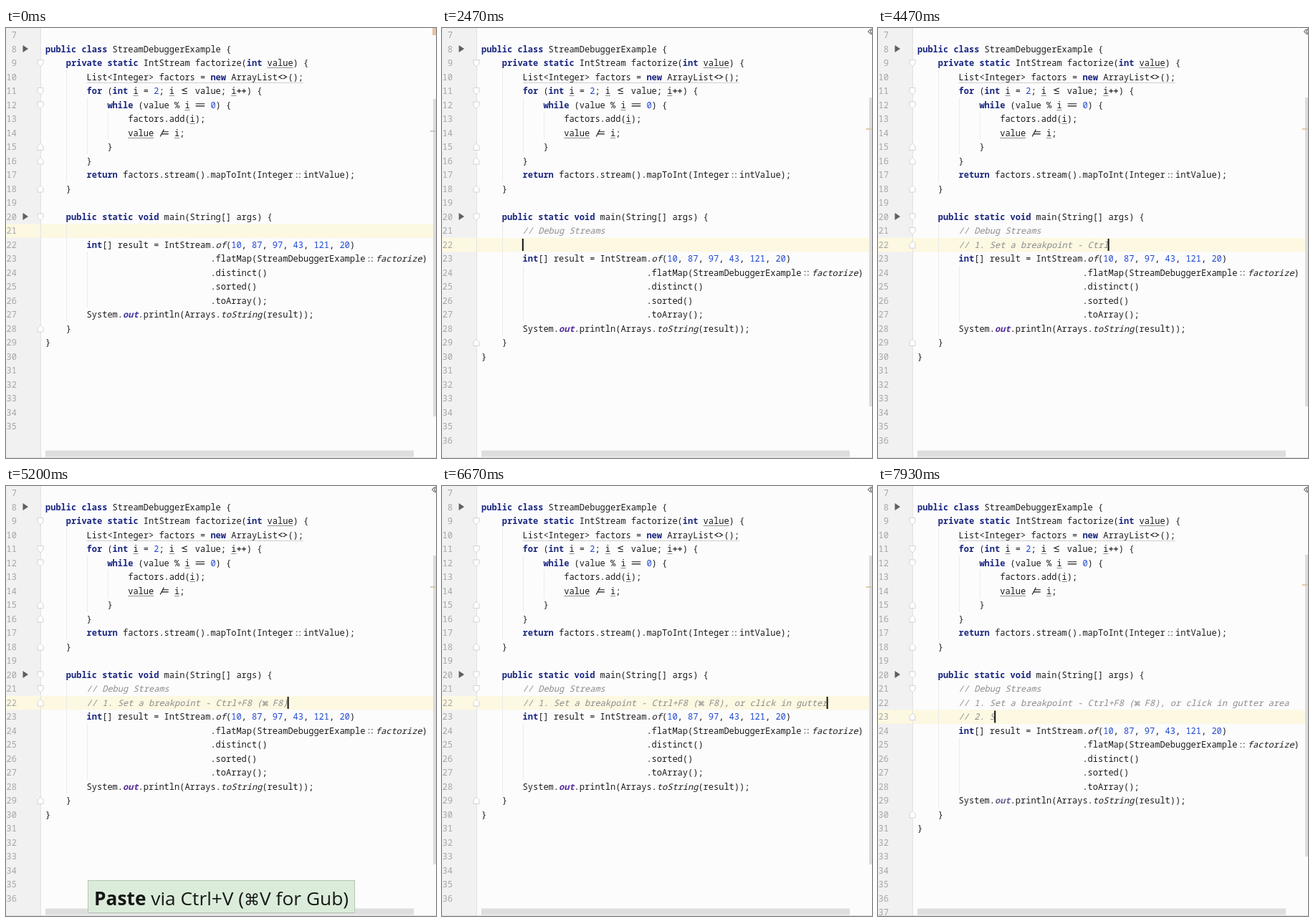
These frames come from a looping animation (600x600 px, 8 s). An HTML page:

```html
<!DOCTYPE html>
<html lang="en">
<head>
<meta charset="utf-8">
<title>Typing comments in a code editor</title>
<style>
  html, body { margin: 0; width: 100%; height: 100%; overflow: hidden; background: #fdfcfd; }
  svg { display: block; width: 600px; height: 600px; }
  text { font: 12px "Noto Sans Mono", "DejaVu Sans Mono", monospace; fill: #1b1b1d; white-space: pre; }
  .kw { font-weight: 700; fill: #18267f; }
  .num { fill: #1f48cf; }
  .it { font-style: italic; }
  .field { font-weight: 700; font-style: italic; }
  .comment { font-style: italic; fill: #8b8b8d; }
  .comment.key { font: 9.5px "DejaVu Sans", sans-serif; fill: #77777a; }
  .line { fill: #a6a6a9; text-anchor: end; }
  .lig { fill: none; stroke: #1b1b1d; stroke-width: 1.15; }
  .fold { fill: #fff; stroke: #d2d2d4; }
  .guide { fill: #ebebec; }
  .popup text { font: 26.3px "Open Sans", "Noto Sans", sans-serif; fill: #161816; }
  .popup .b { font-weight: 700; }
  .popup .cmd { font-size: 22px; font-family: "DejaVu Sans", sans-serif; }
</style>
</head>
<body>
<svg id="stage" viewBox="0 0 600 600"></svg>
<script>
const LOOP = 8000, TICK = 200 / 3;
const CELL = 7.2, LEFT = 55, PITCH = 19.5, INDENT = LEFT + 8 * CELL;
const mid = line => 10 + (line - 7) * PITCH;
const stage = document.getElementById("stage");

function add(parent, tag, attrs = {}, text) {
  const el = document.createElementNS("http://www.w3.org/2000/svg", tag);
  for (const name in attrs) el.setAttribute(name, attrs[name]);
  if (text !== undefined) el.textContent = text;
  parent.append(el);
  return el;
}
const rect = (parent, x, y, width, height, fill, more) =>
  add(parent, "rect", { x, y, width, height, fill, ...more });
const show = (el, on) => el.setAttribute("visibility", on ? "visible" : "hidden");

// Two-cell ligatures, drawn from the baseline
const LIGATURES = {
  "<>": "M6.6-7L1.8-4.2L6.6-1.4M7.8-7L12.6-4.2L7.8-1.4",
  "<=": "M10.6-8.2L3.8-5.5L10.6-2.8M3.8-.5H10.6",
  "==": "M.9-5.8H13.4M.9-2.6H13.4",
  "/=": "M1.8 1L7-9M5.4-5.8H13.4M3.8-2.6H13.4",
  "++": "M.9-4.2H6.7M3.8-7.1V-1.3M7.7-4.2H13.5M10.6-7.1V-1.3",
  "::": "M4.3-5.8h1.5M4.3-.8h1.5M8.6-5.8h1.5M8.6-.8h1.5"
};

// _name_ is underlined, *name* is italic, ~name~ is a static field
const CODE = {
  8: [0, "public class StreamDebuggerExample {"],
  9: [4, "private static IntStream factorize(int _value_) {"],
  10: [8, "List<Integer> factors = new ArrayList<>();"],
  11: [8, "for (int _i_ = 2; _i_ <= value; _i_++) {"],
  12: [12, "while (value % _i_ == 0) {"],
  13: [16, "factors.add(_i_);"],
  14: [16, "_value_ /= _i_;"],
  15: [12, "}"],
  16: [8, "}"],
  17: [8, "return factors.stream().mapToInt(Integer::intValue);"],
  18: [4, "}"],
  20: [4, "public static void main(String[] args) {"],
  22: [8, "int[] result = IntStream.*of*(10, 87, 97, 43, 121, 20)"],
  23: [32, ".flatMap(StreamDebuggerExample::*factorize*)"],
  24: [32, ".distinct()"],
  25: [32, ".sorted()"],
  26: [32, ".toArray();"],
  27: [8, "System.~out~.println(Arrays.*toString*(result));"],
  28: [4, "}"],
  29: [0, "}"]
};
const TOKEN = /_\w+?_|\*\w+\*|~\w+~|\b(?:public|private|static|class|int|new|for|while|return|void)\b|\b\d+\b|<>|<=|==|\/=|\+\+|::/g;

function drawCode(parent, line, [indent, source]) {
  const y = mid(line) + 4;
  let col = indent, from = 0;
  const put = (text, cls) => {
    if (text.trim()) add(parent, "text", { x: LEFT + col * CELL, y, class: cls }, text);
    col += text.length;
  };
  for (const m of source.matchAll(TOKEN)) {
    put(source.slice(from, m.index), "");
    from = m.index + m[0].length;
    const word = m[0], inner = word.slice(1, -1), x = LEFT + col * CELL;
    if (LIGATURES[word]) {
      add(parent, "path", { d: LIGATURES[word], class: "lig", transform: `translate(${x} ${y})` });
      col += 2;
    } else if (word[0] === "_") {
      rect(parent, x, Math.round(y + 2), inner.length * CELL, 1, "#8b8b8e");
      put(inner, "");
    } else if (word[0] === "*") put(inner, "it");
    else if (word[0] === "~") put(inner, "field");
    else put(word, /\d/.test(word) ? "num" : "kw");
  }
  put(source.slice(from), "");
}

function drawFold(parent, line, up) {
  const s = up ? -1 : 1;
  return add(parent, "path", {
    d: `M-4 ${-4.5 * s}H4V${1 * s}L0 ${5 * s}L-4 ${1 * s}Z`,
    class: "fold", transform: `translate(48 ${mid(line)})`
  });
}
function guide(parent, x, first, last) {
  return rect(parent, x, mid(first) - PITCH / 2, 1, (last - first + 1) * PITCH, "", { class: "guide" });
}

// Backdrop
rect(stage, 0, 0, 600, 600, "#fdfcfd");
rect(stage, 0, 0, 48, 600, "#f1f1f2");
const band = rect(stage, 0, 0, 600, 19.5, "#fcf8e1");
rect(stage, 48, 0, 1, 600, "#e2e2e3");
guide(stage, 84, 10, 17);
guide(stage, 113, 12, 15);
guide(stage, 142, 13, 14);
const bodyGuide = guide(stage, 84, 21, 27);

// Everything below the comments moves down as lines are added
const tail = add(stage, "g");
guide(tail, 113, 23, 26);
rect(stage, INDENT, 76, 42 * CELL, 1, "#cfcfd1");
for (const line in CODE) drawCode(line > 21 ? tail : stage, +line, CODE[line]);
const field = tail.querySelector(".field");

const numbers = [];
for (let n = 7; n <= 37; n++) numbers[n] = add(stage, "text", { x: 15, y: mid(n) + 4, class: "line" }, n);
for (const n of [8, 20]) add(stage, "path", { d: "M23.5-5L31 0L23.5 5Z", fill: "#5f5f62", transform: `translate(0 ${mid(n) - .5})` });
for (const n of [9, 11, 12, 20]) drawFold(stage, n, false);
for (const n of [15, 16, 18]) drawFold(stage, n, true);
drawFold(tail, 28, true);
const foldTop = drawFold(stage, 21, false);
const foldEnds = [22, 23].map(n => drawFold(stage, n, true));

// Each comment: text and steps of [tick, characters typed]
const COMMENTS = [
  ["// Debug Streams", [[18, 0], [34, 16]]],
  ["// 1. Set a breakpoint - Ctrl+F8 (⌘ F8), or click in gutter area",
    [[38, 0], [69, 31], [70, 31], [78, 39], [80, 39], [105, 64]]],
  ["// 2. S", [[112, 0], [119, 7]]]
].map(([text, steps], row) => {
  const parts = text.split(/(⌘)/);
  let start = 0;
  const spans = parts.map(part => {
    const key = part === "⌘";
    const el = add(stage, "text", {
      x: INDENT + start * CELL - (key ? .5 : 0), y: mid(21 + row) + 4,
      class: key ? "comment key" : "comment"
    });
    const span = { el, part, start };
    start += part.length;
    return span;
  });
  return { steps, spans };
});

const caret = rect(stage, 0, 0, 2, 17, "#111");

// Scroll bars, marks and the corner icon
rect(stage, 55, 589.5, 514, 9, "#dededf");
rect(stage, 0, 599, 600, 1, "#dcdcdd");
const thumb = rect(stage, 596, 0, 4, 10, "#dcdcdd");
const mark = rect(stage, 592, 0, 8, 2, "#c8c8c8");
const badge = rect(stage, 595, 0, 5, 10, "#e6c4a4");
const eye = add(stage, "g", { fill: "none", stroke: "#717174", "stroke-width": 1.2 });
add(eye, "path", { d: "M601 1.2Q597 1.5 594.5 5Q597 8.700 601 9" });
add(eye, "circle", { cx: 600, cy: 5, r: 2 });

const popup = add(stage, "g", { class: "popup" });
rect(popup, 114.5, 550.5, 372, 45, "#dcecdb", { stroke: "#b4c6b3" });
const label = add(popup, "text", { x: 123, y: 584.5 });
add(label, "tspan", { class: "b" }, "Paste");
add(label, "tspan", {}, " via Ctrl+V (");
add(label, "tspan", { class: "cmd" }, "⌘");
add(label, "tspan", {}, "V for Gub)");

function along(steps, k) {
  if (k <= steps[0][0]) return steps[0][1];
  for (let i = 1; i < steps.length; i++) {
    const [a, from] = steps[i - 1], [b, to] = steps[i];
    if (k <= b) return from + (to - from) * (k - a) / (b - a);
  }
  return steps[steps.length - 1][1];
}

function draw(k) {
  const added = k < 36 ? 0 : k < 108 ? 1 : 2;
  const y = mid(21 + added);
  band.setAttribute("y", y - 9.75);
  tail.setAttribute("transform", `translate(0 ${added * PITCH})`);
  bodyGuide.setAttribute("height", (7 + added) * PITCH);
  field.style.fill = ["#3a34a0", "#522c98", "#63638f"][added];
  show(numbers[36], added > 0);
  show(numbers[37], added > 1);

  let typed = 0;
  COMMENTS.forEach(({ steps, spans }, row) => {
    const count = Math.round(along(steps, k));
    if (row === added) typed = count;
    for (const { el, part, start } of spans) el.textContent = part.slice(0, Math.max(0, count - start));
  });
  caret.setAttribute("x", INDENT - .8 + typed * CELL);
  caret.setAttribute("y", y - 8.5);
  show(caret, k >= 18 || (k >= 3 && k < 10));

  show(foldTop, k >= 44);
  show(foldEnds[0], k >= 44 && k < 117);
  show(foldEnds[1], k >= 117);

  const top = [99, 97, 96][added];
  thumb.setAttribute("y", top);
  thumb.setAttribute("height", [542, 528, 517][added] - top);
  mark.setAttribute("y", [143, 140, 137][added]);
  mark.setAttribute("fill", added ? "#dbcba6" : "#c8c8c8");
  show(badge, k < 18);
  show(eye, k >= 18);
  popup.setAttribute("opacity", along([[71, 0], [73, 1], [80, 1], [83, 0]], k));
}

let last = -1;
const begin = performance.now();
function frame() {
  const t = (performance.now() - begin) % LOOP;
  const k = Math.floor((t + 4) / TICK);
  if (k !== last) draw(last = k);
  requestAnimationFrame(frame);
}
frame();
</script>
</body>
</html>
```
